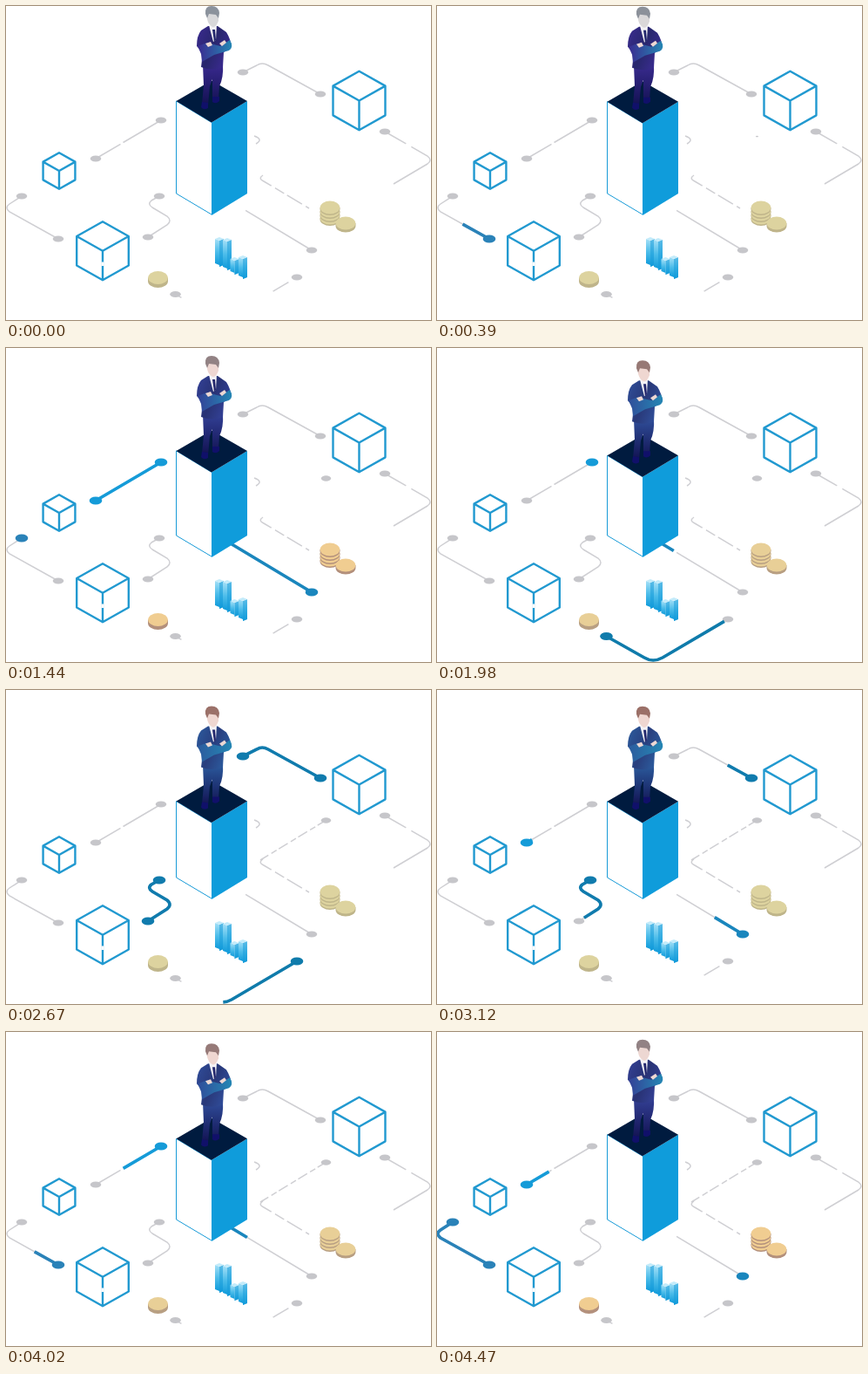
These frames come from a looping animation (488x360 px, 4500 ms). An HTML page:

```html
<!DOCTYPE html>
<html lang="en">
<head>
<meta charset="utf-8">
<style>
  html, body { margin: 0; height: 100%; overflow: hidden; background: #fff; }
  svg { display: block; width: 488px; height: 360px; }
</style>
</head>
<body>
<svg id="stage" viewBox="0 0 488 360">
  <defs>
    <linearGradient id="suit" x2="1" y2=".5">
      <stop stop-color="var(--cloth)"/><stop offset=".55" stop-color="var(--shade)"/><stop offset="1" stop-color="var(--cloth)"/>
    </linearGradient>
    <linearGradient id="arm">
      <stop stop-color="var(--cloth)"/><stop offset="1" stop-color="#2587b4"/>
    </linearGradient>
    <linearGradient id="leg" x2="0" y2="1">
      <stop stop-color="var(--cloth)"/><stop offset="1" stop-color="#11104f"/>
    </linearGradient>
    <linearGradient id="bar" x2="0" y2="1">
      <stop stop-color="#a5e0f7"/><stop offset=".5" stop-color="#4dbdea"/><stop offset="1" stop-color="#109bdb"/>
    </linearGradient>
  </defs>
  <g id="tracks" fill="none" stroke="#cfcfd3" stroke-width="1.5">
    <path d="M435 144L484 172Q490 177 484 181L445 204" stroke-dasharray="28 7 200"/>
    <path d="M285 149Q296 153 287 158"/>
    <path d="M295 194Q289 198 296 201L348 232" stroke-dasharray="20 5 12 4"/>
    <path id="upper" d="M368 149L292 195" stroke-dasharray="12 3 7 4"/>
  </g>
  <g id="dots" fill="#c6c6ca"><ellipse cx="435" cy="144" rx="6.3" ry="3.5"/><ellipse id="spot" cx="367.5" cy="149.5"/></g>
  <g id="flows" fill="none" stroke-width="3.7"></g>
  <g id="cubes" fill="none" stroke="#2199d0" stroke-width="2.4" stroke-linejoin="round"></g>
  <path d="M111 293.500V298" stroke="#fff" stroke-width="3"/>
  <g id="bars"></g>
  <g id="coins"></g>
  <path id="left" fill="#fff" stroke="#189bd8"/>
  <path id="right" fill="#0f9cdb"/>
  <path id="top" fill="#001b3f"/>
  <g id="man">
    <path d="M226 67L249 66Q250 82 245 92L244 107Q241 110 237 107L237 84L234 92L232 114Q228 117 225 112L227 91Z" fill="url(#leg)"/>
    <path d="M225 110L232 111L232 117Q227 120 224 116ZM237 104L245 104L245 109Q241 113 237 110Z" fill="#10106a"/>
    <path d="M232 23L243 23L253 30Q258 38 259 47L250 53L249 70Q237 75 224 70L226 54L219 46Q219 34 224 28Z" fill="url(#suit)"/>
    <path d="M233 22L242 21L241 39L238 41Z" fill="#f4f3f6"/>
    <path d="M237 27L240 27L241 39L239 41Z" fill="#20246b"/>
    <path d="M220 46L231 42L246 46L257 39Q262 47 256 51L239 56L225 64L224 55Z" fill="url(#arm)"/>
    <path d="M229 43L235 41L237 45L232 47ZM245 43L251 39L253 42L248 46Z" fill="#eed8d3"/>
    <path d="M231 7Q237 3 244 8L244 17Q241 25 237 24Q232 21 231 15Z" fill="var(--face)"/>
    <path d="M229 9Q228 0 236 0Q244 0 245 8L244 14L241 10L233 9L231 14Z" fill="var(--hair)"/>
  </g>
</svg>
<script>
const $ = id => document.getElementById(id);
const set = (el, attrs) => { for (const k in attrs) el.setAttribute(k, attrs[k]); return el; };
const add = (parent, tag, attrs) =>
  $(parent).appendChild(set(document.createElementNS('http://www.w3.org/2000/svg', tag), attrs));
const clamp = v => Math.min(1, Math.max(0, v));
const show = (el, on) => set(el, { visibility: on ? 'visible' : 'hidden' });
const mix = (a, b, k) => '#' + [1, 3, 5].map(i => {
  const [p, q] = [a, b].map(c => parseInt(c.slice(i, i + 2), 16));
  return Math.round(p + (q - p) * k).toString(16).padStart(2, '0');
}).join('');

function cube(x, y, h) {
  const w = h * .89, r = h / 2;
  add('cubes', 'path', { d: `M${x} ${y - h}l${w} ${r}v${h}l${-w} ${r}l${-w} ${-r}v${-h}zM${x - w} ${y - r}l${w} ${r}l${w} ${-r}M${x} ${y}v${h}` });
}
cube(405.5, 108.5, 33.7);
cube(111, 280.7, 33.5);
cube(61, 189, 20.7);

function bar(x, y, h) {
  add('bars', 'path', { fill: 'url(#bar)', d: `M${x} ${y}l5 2v${h}l-5 -2z` });
  add('bars', 'path', { fill: 'url(#bar)', d: `M${x + 5} ${y + 2}l5 -2v${h + 2}l-5 2z` });
  add('bars', 'path', { fill: '#0f98d8', opacity: .5, d: `M${x + 5} ${y + 2}l5 -2v${h + 2}l-5 2z` });
  add('bars', 'path', { fill: '#c3ebfa', d: `M${x} ${y}l5 -2l5 2l-5 2z` });
}
bar(240, 267, 28);
bar(249, 268, 31);
bar(257.5, 290, 14);
bar(267, 288, 21);

function coin(x, y, depth) {
  add('coins', 'path', { fill: 'var(--rim)', d: `M${x - 11.5} ${y}v${depth}a11.5 7.5 0 0 0 23 0v${-depth}z` });
  add('coins', 'ellipse', { fill: 'var(--coin)', cx: x, cy: y, rx: 11.3, ry: 7.5 });
}
for (let y = 243; y > 230; y -= 4) coin(372, y, 1.5);
coin(390, 249, 3);
coin(174.5, 311.5, 4);

// A grey track with end dots, over which a coloured line grows, holds and is erased
const GROW = 500, ERASE = 450;
function flow(d, color, starts, { hold = 250, dash = 'none' } = {}) {
  add('tracks', 'path', { d, pathLength: 100, 'stroke-dasharray': dash });
  const line = add('flows', 'path', { d, stroke: color, pathLength: 100 });
  const [first, last] = [0, line.getTotalLength()].map(at => {
    const { x: cx, y: cy } = line.getPointAtLength(at);
    add('dots', 'ellipse', { cx, cy, rx: 6.3, ry: 3.5 });
    return add('flows', 'ellipse', { cx, cy, rx: 7.3, ry: 4.5, fill: color });
  });
  return t => {
    const age = t - (starts.filter(s => s <= t).pop() ?? Infinity);
    const erase = age - GROW - hold;
    const head = 100 * clamp(age / GROW), tail = 100 * clamp(erase / ERASE);
    set(line, { 'stroke-dasharray': `0 ${tail} ${head - tail} 200` });
    show(line, head > tail);
    show(first, age >= 0 && erase < 30);
    show(last, age >= GROW && erase < ERASE + 50);
  };
}
const flows = [
  flow('M103 175L178 131', '#159bd8', [740, 3080, 4300], { dash: '38 4 60' }),
  flow('M60 267L4 236Q-2 231 4 227L18 218', '#2a82b8', [200, 3850]),
  flow('M351 280L236 211', '#1a86bd', [920, 2980, 4450], { dash: '66 100' }),
  flow('M194.500 330.500L238 355Q248 361 259 355L334 311', '#0f7bab', [1495], { hold: 500, dash: '5 75 13 100' }),
  flow('M272 76L288 68Q294 64 301 68L361 101', '#107bad', [2060]),
  flow('M163 265L185 251Q191 246 185 241L168 231Q162 227 167 223L176 218', '#107bad', [2060], { hold: 520 })
];

function draw(t) {
  const dy = 9.5 * (1 - Math.cos(2 * Math.PI * (t - 50) / 5800));
  const side = 109 + dy, front = 133.5 + dy, back = 85.5 + dy;
  set($('man'), { transform: `translate(0 ${dy})` });
  set($('left'), { d: `M236 239L195.500 215V${side}L236 ${front}` });
  set($('right'), { d: `M236 ${front}L277 ${side}V215L236 240Z` });
  set($('top'), { d: `M195.500 ${side}L236 ${back}L277 ${side}L236 ${front}Z` });

  flows.forEach(update => update(t));
  const grown = clamp(t / 1450);
  set($('spot'), { rx: 5.7 * grown, ry: 3.2 * grown });
  show($('upper'), t > 2200);

  const rise = dy / 19, warm = ((1 - Math.cos(2 * Math.PI * t / 3000)) / 2) ** 2;
  const colors = {
    cloth: mix('#3a2a90', '#2c5c9e', rise),
    shade: mix('#28266c', '#293f7e', rise),
    hair: mix('#8b929c', '#9b7068', rise),
    face: mix('#d8d8da', '#efd7d1', clamp(rise * 2)),
    coin: mix('#ddd39f', '#f0cd91', warm),
    rim: mix('#bfb58a', '#b3907c', warm)
  };
  for (const name in colors) $('stage').style.setProperty('--' + name, colors[name]);
}

function tick() {
  draw(Math.floor(performance.now() % 4500 / 30) * 30);
  requestAnimationFrame(tick);
}
tick();
</script>
</body>
</html>
```
